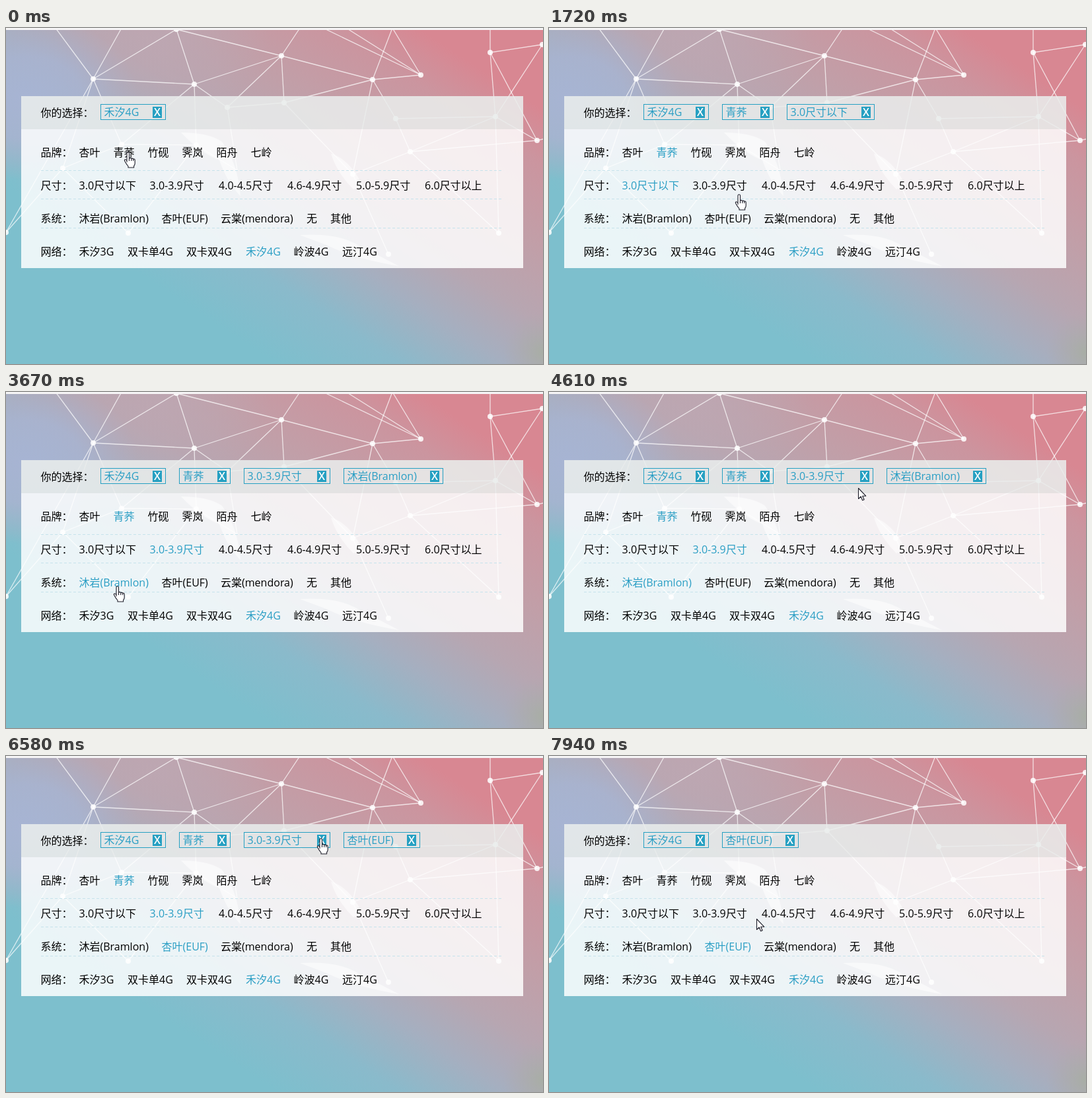
Recreate the animation shown at these times as an HTML page. Size 813 by 508 pixels, loop 8 s.

```html
<!DOCTYPE html>
<html lang="zh-CN">
<head>
<meta charset="utf-8">
<title>筛选</title>
<style>
html, body { margin: 0; width: 100%; height: 100%; overflow: hidden; }
svg { display: block; width: 813px; height: 508px; }
text { font: 16px 'Open Sans', 'Noto Sans', 'Noto Sans CJK SC', 'Noto Sans CJK', sans-serif; fill: #000; white-space: pre; }
.on, .tag text { fill: #2a9ec4; }
.tag .box { fill: none; stroke: #26a0c2; }
.tag .close { fill: #26a0c2; }
.tag .x { fill: #fff; font-weight: 600; text-anchor: middle; }
#cursor path { fill: #fff; stroke: #1c1c28; stroke-width: 1.1; stroke-linejoin: round; }
</style>
</head>
<body>
<svg viewBox="0 0 813 508">
  <defs>
    <linearGradient id="sky" gradientUnits="userSpaceOnUse" x1="-110" y1="168" x2="187" y2="-286">
      <stop offset="0" stop-color="#7dbfcd"/>
      <stop offset=".19" stop-color="#8abacb"/>
      <stop offset=".35" stop-color="#a5afc0"/>
      <stop offset=".5" stop-color="#b7a6b1"/>
      <stop offset=".67" stop-color="#c19fa8"/>
      <stop offset=".87" stop-color="#cb959f"/>
      <stop offset="1" stop-color="#d88792"/>
    </linearGradient>
    <radialGradient id="haze">
      <stop offset="0" stop-color="#a7b4d3"/>
      <stop offset=".5" stop-color="#a9b3d0" stop-opacity=".85"/>
      <stop offset="1" stop-color="#b0aec6" stop-opacity="0"/>
    </radialGradient>
    <radialGradient id="moss">
      <stop offset="0" stop-color="#a8aea5"/>
      <stop offset="1" stop-color="#adaaad" stop-opacity="0"/>
    </radialGradient>
    <radialGradient id="mauve">
      <stop offset="0" stop-color="#bda7b2" stop-opacity=".9"/>
      <stop offset="1" stop-color="#bda7b2" stop-opacity="0"/>
    </radialGradient>
  </defs>
  <rect width="813" height="508" fill="url(#sky)"/>
  <ellipse cx="230" cy="20" rx="170" ry="120" fill="url(#mauve)"/>
  <ellipse cx="30" cy="105" rx="170" ry="125" fill="url(#haze)"/>
  <circle cx="813" cy="490" r="60" fill="url(#moss)"/>
  <g id="net" stroke="#fff" stroke-opacity=".72" stroke-width="1.3" fill="#fff"></g>
  <g fill="#fff" opacity=".55">
    <path d="M445 313q55-3 84 13l66 34q-70-12-110-32z"/>
    <path d="M492 190q28 8 48 48l-14 6q-25-25-34-54z"/>
    <path d="M265 158q42 0 62 14 24 32 28 82-20-20-32-54-30-12-58-42z"/>
  </g>
  <rect width="813" height="3" fill="#f6f5f6"/>
  <rect x="23" y="103" width="760" height="260" fill="#fff" opacity=".84"/>
  <rect x="23" y="103" width="760" height="50" fill="#9fb0aa" opacity=".2"/>
  <path d="M53 215.5H751M53 258.5H751M53 302.5H751" stroke="#c6e3ec" stroke-dasharray="4 3"/>
  <text x="52.5" y="134">你的选择：</text>
  <g id="rows"></g>
  <g id="tags"></g>
  <g id="cursor">
    <g id="hand">
      <path d="M-1.5 15V2a1.7 1.7 0 0 1 3.5 0v7.5q1.7-1.5 3.3.5 1.6-1 3 .6 2.3-.6 2.4 1.6v5q0 2-1.6 4v2.3h-8.6v-2q-3-3.5-5.5-8.3-.5-2 1.2-2 1.2.2 2.3 2z"/>
      <path d="M2 9.5v4M5.3 10v3.5M8.3 10.6v3"/>
    </g>
    <path id="arrow" d="M0 0V16l3.7-3.5 2.4 5.8 2.5-1-2.4-5.6h5z"/>
  </g>
</svg>
<script>
const $ = id => document.getElementById(id);
const LOOP = 8000;

// Constellation: lettered nodes, links as letter pairs; lower-case nodes have no dot
const nodes = {
  A: [258, 2], B: [132, 77], C: [285, 85], D: [417, 42], E: [555, 78], F: [628, 71],
  G: [733, 37], H: [804, 170], I: [335, 120], J: [421, 113], K: [612, 187], L: [525, 221],
  M: [746, 310], N: [741, 134], O: [590, 137], P: [175, 176], Q: [185, 310], R: [0, 309],
  S: [579, 342], T: [812, 25], U: [86, 212], V: [288, 177],
  a: [75, 0], b: [175, 0], c: [445, 0], d: [480, 0], e: [515, 0], f: [585, 0], g: [733, 0], h: [813, 168], i: [350, 215]
};
const links = 'AB AC AD BP BC BU BR Ba Bb CD CI CP CV DI DJ DE Dc EF Ef EJ EL EO Ff Fe Fd ' +
  'GT GN GH Gg NH NT Hh HK OK ON KN LK LJ RU UQ QV PV UP MK MN SL IJ Vi Ii';
$('net').innerHTML = links.split(' ').map(([p, q]) =>
  `<path d="M${nodes[p]}L${nodes[q]}"/>`).join('') +
  Object.keys(nodes).filter(k => k < 'a').map(k => {
    const [x, y] = nodes[k];
    return `<circle cx="${x}" cy="${y}" r="4" stroke="none" opacity=".85"/>`;
  }).join('');

// Each row: label, item names, left edges (the last one closes the row)
const rows = [
  ['品牌：', '杏叶 青荞 竹砚 霁岚 陌舟 七岭', [110.5, 162.5, 214.5, 266.5, 318.5, 370.5, 422.5]],
  ['尺寸：', '3.0尺寸以下 3.0-3.9尺寸 4.0-4.5尺寸 4.6-4.9尺寸 5.0-5.9尺寸 6.0尺寸以上',
    [110.5, 217.5, 322, 426, 530, 634, 741]],
  ['系统：', '沐岩(Bramlon) 杏叶(EUF) 云棠(mendora) 无 其他', [110.5, 235.5, 325, 455, 491, 543]],
  ['网络：', '禾汐3G 双卡单4G 双卡双4G 禾汐4G 岭波4G 远汀4G', [110.5, 184, 273, 363, 435.5, 509, 582]]
];
const items = {};
$('rows').innerHTML = rows.map(([label, names, xs], r) => {
  const y = 188 + 50 * r;
  return `<text x="52.5" y="${y + 6}">${label}</text>` + names.split(' ').map((name, c) => {
    const id = `${r}${c}`;
    items[id] = { name, x: xs[c], y, w: xs[c + 1] - xs[c] - 20 };
    return `<text id="i${id}" x="${xs[c]}" y="${y + 6}">${name}</text>`;
  }).join('');
}).join('');

// Chosen items (row and column) from each moment on
const choices = [
  [0, '33'], [294, '33 01'], [1440, '33 01 10'], [2131, '33 01 11'], [3511, '33 01 11 20'],
  [5500, '33 01 11 21'], [6700, '33 01 21'], [7640, '33 21']
];

// Pointer tip: time, x, y
const path = [
  [0, 184, 187], [440, 184, 188], [1160, 190, 240], [1440, 190, 240], [1720, 287, 251],
  [2270, 287, 251], [2697, 259, 295], [2980, 180, 322], [3100, 168, 323], [3374, 168, 293],
  [3648, 168, 293], [4060, 281, 289], [4180, 320, 262], [4583, 468, 145], [4717, 474, 123],
  [4851, 474, 123], [5120, 390, 215], [5240, 340, 258], [5370, 288, 292], [5500, 290, 293],
  [5630, 314, 292], [5760, 325, 280], [6150, 440, 180], [6300, 462, 148], [6434, 474, 128],
  [6568, 476, 124], [6702, 476, 124], [7240, 330, 125], [7360, 330, 126], [7640, 330, 126],
  [7940, 314, 246]
];

// Bursts of movement: first change, last change, count
const bursts = [
  [150, 1160, 8], [1440, 1720, 3], [1990, 2980, 8], [3100, 4060, 8], [4180, 5120, 8],
  [5240, 6150, 8], [6300, 7240, 8], [7360, 7360, 1], [7640, 7940, 3]
];

function snap(t) {
  const burst = bursts.filter(b => b[0] <= t).pop();
  if (!burst) return 0;
  const [start, end, count] = burst;
  if (t >= end) return end;
  const step = (end - start) / (count - 1);
  return start + Math.floor((t - start) / step + 1e-6) * step;
}

function pointerAt(t) {
  const n = path.findIndex(p => p[0] > t);
  if (n < 0) return path[path.length - 1].slice(1);
  const [t0, x0, y0] = path[n - 1], [t1, x1, y1] = path[n];
  const k = (t - t0) / (t1 - t0);
  return [x0 + (x1 - x0) * k, y0 + (y1 - y0) * k].map(Math.round);
}

let shown = '', closers = [];
function showChoice(choice) {
  if (choice === shown) return;
  shown = choice;
  const ids = choice.split(' ');
  for (const id in items) $('i' + id).classList.toggle('on', ids.includes(id));
  let x = 143;
  closers = [];
  $('tags').innerHTML = ids.map(id => {
    const { name, w } = items[id];
    const width = Math.round(w + 46), left = x, close = x + width - 20;
    x += width + 20;
    closers.push(close);
    return `<g class="tag"><rect class="box" x="${left + .5}" y="115.5" width="${width - 1}" height="23"/>
      <text x="${left + 5.5}" y="133">${name}</text>
      <rect class="close" x="${close}" y="119" width="14" height="17"/>
      <text class="x" x="${close + 7}" y="133">X</text></g>`;
  }).join('');
}

function isOverLink(x, y) {
  return Object.values(items).some(i => x >= i.x && x <= i.x + i.w && Math.abs(y - i.y) <= 14) ||
    closers.some(c => x >= c && x <= c + 14 && y >= 117 && y <= 137);
}

function render(time) {
  const t = snap(time);
  showChoice(choices.filter(c => c[0] <= t).pop()[1]);
  const [x, y] = pointerAt(t);
  const hand = isOverLink(x, y);
  $('cursor').setAttribute('transform', `translate(${x + .5} ${y + .5})`);
  $('hand').style.display = hand ? '' : 'none';
  $('arrow').style.display = hand ? 'none' : '';
}

function tick(now) {
  render(now % LOOP);
  requestAnimationFrame(tick);
}
render(0);
requestAnimationFrame(tick);
</script>
</body>
</html>
```
